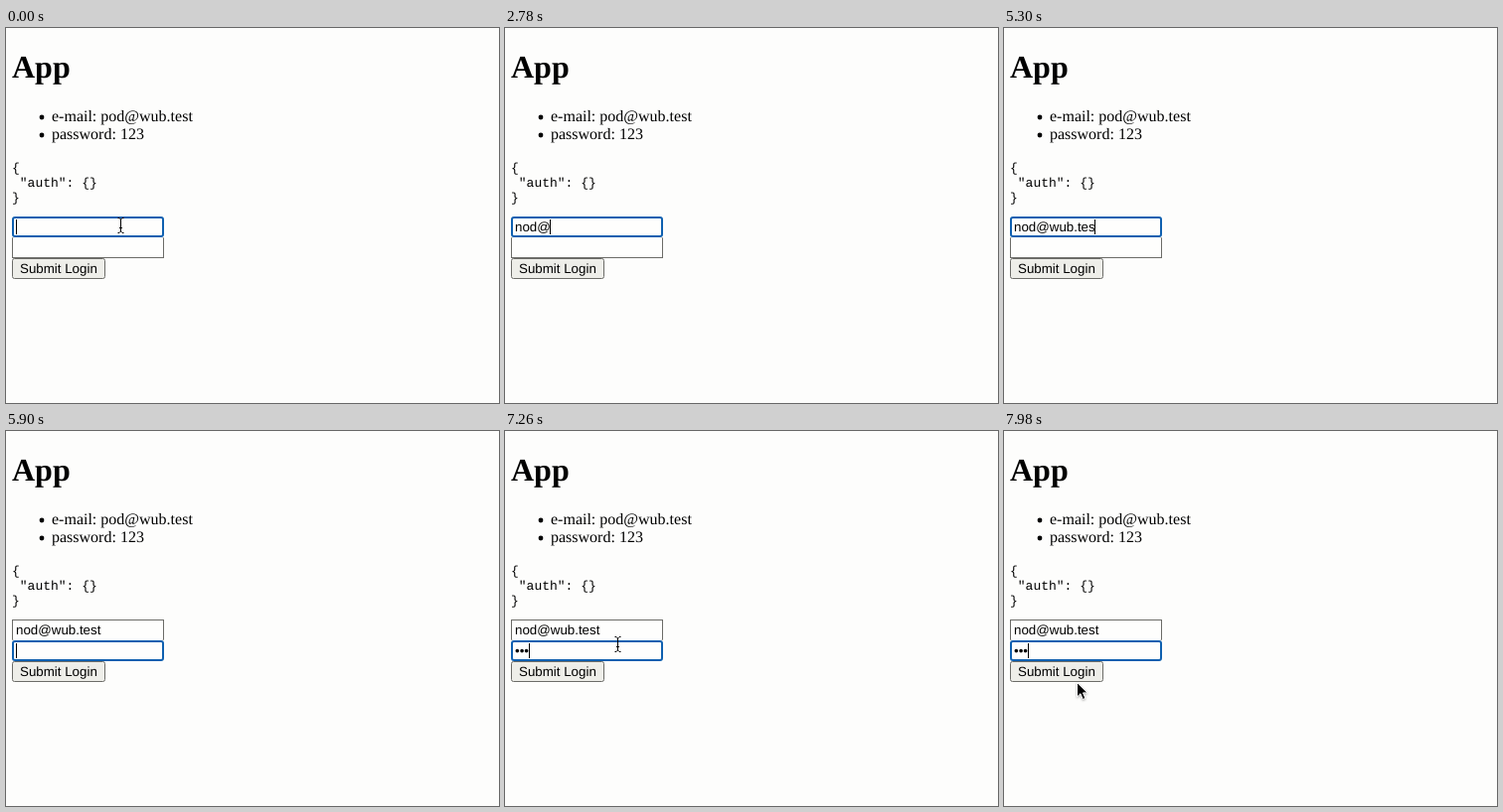
Animation of 496 by 378 pixels, one loop 8000 ms. Source, as an HTML page:

```html
<!DOCTYPE html>
<html lang="en">
<head>
<meta charset="utf-8">
<title>Login form</title>
<style>
  html, body { margin: 0; width: 100%; height: 100%; overflow: hidden; background: #fdfdfc; }
  svg { display: block; width: 100%; height: 100%; }
  text { white-space: pre; fill: #000; text-rendering: geometricPrecision; }
  .serif { font: 16px "Liberation Serif", "Times New Roman", serif; }
  .title { font: bold 32px "Liberation Serif", "Times New Roman", serif; }
  .mono { font: 13px "Liberation Mono", "Courier New", monospace; }
  .ui { font: 13.333px "Liberation Sans", Arial, sans-serif; }
  .field { fill: #fefefd; stroke: #6c6c68; }
  .halo { fill: none; stroke: #fefefd; stroke-width: 4; }
  .ring { fill: none; stroke: #0f60b0; stroke-width: 2; }
  #arrow { filter: drop-shadow(0 1px 1px rgba(0, 0, 0, .3)); }
</style>
</head>
<body>
<svg viewBox="0 0 496 378">
  <text class="title" x="6" y="50">App</text>
  <circle cx="36" cy="90" r="2.4"/>
  <text class="serif" x="46" y="94">e-mail: pod@wub.test</text>
  <circle cx="36" cy="108" r="2.4"/>
  <text class="serif" x="46" y="112">password: 123</text>
  <text class="mono" x="6" y="145">{</text>
  <text class="mono" x="6" y="160"> "auth": {}</text>
  <text class="mono" x="6" y="175">}</text>

  <rect class="field" x="6.5" y="190.5" width="152" height="20"/>
  <rect class="field" x="6.5" y="211.5" width="152" height="20"/>

  <g id="ring">
    <rect class="halo" x="7" y="191" width="151" height="19" rx="2"/>
    <rect class="ring" x="7" y="191" width="151" height="19" rx="2"/>
  </g>
  <rect x="6.5" y="232.5" width="93" height="20" rx="2" fill="#eeeee9" stroke="#6c6c68"/>
  <text class="ui" x="14" y="247">Submit Login</text>
  <text id="email" class="ui" x="10" y="205"></text>
  <text id="pass" class="ui" x="10" y="226"></text>
  <rect id="caret" x="10" y="193" width="1" height="15"/>

  <g id="beam" fill="none" stroke="#000">
    <path d="M-3 -7.5H-1.5L0 -6L1.5 -7.5H3M0 -6V6M-3 7.5H-1.5L0 6L1.5 7.5H3M-1.5 2.5H1.5"/>
  </g>
  <path id="arrow" d="M0 0V14.5L3.4 11.3L5.8 17L8.4 15.9L6 10.4H10.6Z"
        fill="#000" stroke="#fff" stroke-linejoin="round"/>
</svg>
<script>
  const LOOP = 8000;
  const FOCUS = 5720;
  const EMAIL = "nod@wub.test";
  const emailKeys = [1140, 1560, 1960, 2640, 3500, 3800, 3920, 4180, 4740, 5040, 5300, 5440];
  const passKeys = [6600, 6800, 6940];

  // time, x, y
  const path = [
    [7060, 115, 199], [7300, 113, 218], [7400, 108, 226], [7580, 94, 239],
    [7680, 94, 239], [7860, 79, 256], [7980, 73, 253]
  ];

  const [ring, email, pass, caret, beam, arrow] =
    ["ring", "email", "pass", "caret", "beam", "arrow"].map(id => document.getElementById(id));

  const typed = (keys, t) => keys.filter(k => k <= t).length;
  const show = (el, on) => el.setAttribute("visibility", on ? "visible" : "hidden");
  const move = (el, x, y) => el.setAttribute("transform", `translate(${x} ${y})`);

  function setText(el, s) {
    if (el.textContent !== s) el.textContent = s;
  }

  function mouseAt(t) {
    if (t <= path[0][0]) return path[0].slice(1);
    for (let i = 1; i < path.length; i++) {
      const [t0, x0, y0] = path[i - 1], [t1, x1, y1] = path[i];
      if (t < t1) {
        const k = (t - t0) / (t1 - t0);
        return [x0 + (x1 - x0) * k, y0 + (y1 - y0) * k];
      }
    }
    return path[path.length - 1].slice(1);
  }

  function draw(t) {
    setText(email, EMAIL.slice(0, typed(emailKeys, t)));
    setText(pass, "\u2022".repeat(typed(passKeys, t)));

    const second = t >= FOCUS;
    const input = second ? pass : email;
    const width = input.textContent ? input.getComputedTextLength() : 0;
    const drop = second ? 21 : 0;
    move(ring, 0, drop);
    move(caret, Math.floor(width), drop);
    show(caret, t < 980 || t >= emailKeys[0]);

    // The pointer hides while typing
    const [x, y] = mouseAt(t).map(Math.round);
    const seen = t < emailKeys[0] || t >= path[0][0];
    const overField = y < 222;
    show(beam, seen && overField);
    show(arrow, seen && !overField);
    move(beam, x + 0.5, y);
    move(arrow, x + 0.5, y + 0.5);
  }

  const start = performance.now();
  function tick() {
    draw((performance.now() - start) % LOOP);
    requestAnimationFrame(tick);
  }
  tick();
</script>
</body>
</html>
```
